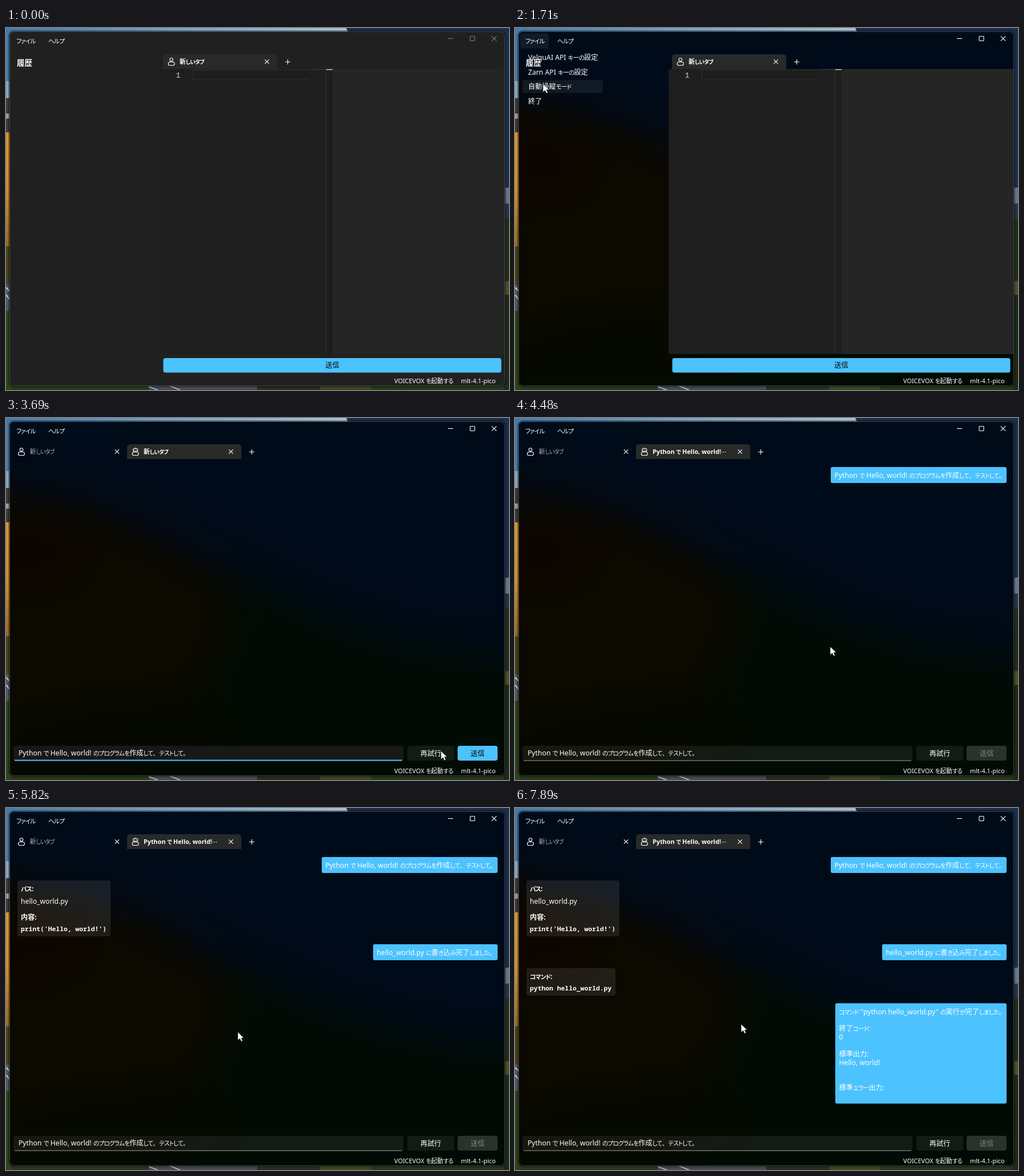
Animation of 881x635 px, one loop 8 s. Source, as an HTML page:

```html
<!DOCTYPE html>
<html lang="ja">
<head>
<meta charset="utf-8">
<style>
  html, body { margin: 0; width: 100%; height: 100%; overflow: hidden; background: #202020; }
  svg { display: block; }
  text { font: 12.2px 'Noto Sans', 'Noto Sans CJK JP', sans-serif; fill: #fff; white-space: pre; }
  .kana, .stop { font-family: 'Noto Sans CJK JP', sans-serif; font-size: .88em; }
  .kana { font-feature-settings: 'palt'; letter-spacing: -.08em; }
  .bold { font-weight: 700; }
  .title { font-size: 16px; font-weight: 700; }
  .title .kana { font-size: 1em; letter-spacing: -.04em; }
  .mono { font-family: 'Noto Sans Mono', monospace; font-size: 11.36px; font-weight: 600; }
  .small { font-size: 10.9px; }
  .small .kana { font-size: .94em; }
  .head { font-size: 13.5px; font-weight: 700; }
  .tab { font-size: 10.8px; font-weight: 700; }
  .dim { fill: #b0b0b0; font-size: 11.2px; }
  .line { fill: none; stroke: #fff; stroke-width: 1.1; }
</style>
</head>
<body>
<svg id="stage" width="881" height="635" viewBox="0 0 881 635"></svg>
<script>
const BLUE = '#4cc2ff', HOVER = '#49b0e6';
const SOFT = 'rgba(255,255,255,.065)';
const PROMPT = 'Python で Hello, world! のプログラムを作成して、テストして。';
const NEW_TAB = '新しいタブ';

// Kana are set proportionally and a little smaller than kanji; punctuation keeps its full width.
const kana = s => s.replace(/[ぁ-ヿ]+/g, '<tspan class="kana">$&</tspan>')
  .replace(/[、。…]/g, '<tspan class="stop">$&</tspan>');
const text = (x, mid, s, cls = '', attrs = '') =>
  `<text x="${x}" y="${mid + (cls === 'title' ? 6 : 4.4)}" class="${cls}" ${attrs}>${kana(s)}</text>`;
const label = (x, mid, s, fill = '#fff', id = '') =>
  text(x, mid, s, '', `id="${id}" text-anchor="middle" style="fill:${fill}"`);
const rect = (x, y, w, h, fill, r = 0, attrs = '') =>
  `<rect x="${x}" y="${y}" width="${w}" height="${h}" rx="${r}" fill="${fill}" ${attrs}/>`;
const group = (id, ...parts) => `<g id="${id}">${parts.join('')}</g>`;
const line = d => `<path class="line" d="${d}"/>`;
const cross = (x, y, r = 3.7) => line(`M${x - r} ${y - r}l${2 * r} ${2 * r}m0 ${-2 * r}l${-2 * r} ${2 * r}`);
const plus = (x, y) => line(`M${x - 4.5} ${y}h9m-4.5-4.5v9`);
const body = (x, y) => rect(x - 5.5, y + .8, 11, 5.7, 'none', 2.8, 'class="line"');
const person = (x, y) => `<circle class="line" cx="${x}" cy="${y - 3.4}" r="2.8"/>` + body(x, y);
const robot = (x, y) => rect(x - 4, y - 5.5, 8, 5, 'none', 2, 'class="line"') + body(x, y) +
  line(`M${x} ${y - 7}v1.5M${x - 2.2} ${y - 3}h1.4m1.6 0h1.4`);
const tab = x => `<path d="M${x} 72V52q0-6 6-6h188q6 0 6 6v20z" fill="#282a29"/>`;
const bands = (x, w, list) => list.map(([y, h, fill]) => rect(x, y, w, h, fill)).join('');
const gradient = (id, x2, y2, ...colors) => `<linearGradient id="${id}" x2="${x2}" y2="${y2}">` +
  colors.map((c, i) => `<stop offset="${i / (colors.length - 1)}" stop-color="${c}"/>`).join('') + '</linearGradient>';

const wallpaper = () =>
  rect(0, 0, 881, 635, '#26381a') + rect(0, 0, 600, 9, 'url(#sky)') +
  '<path d="M596 0H881V9H600z" fill="#1b2d4a"/>' +
  bands(0, 9, [[0, 93, '#447aa8'], [93, 30, '#86a5be'], [123, 60, '#3b3a37'], [150, 9, '#9b9a94'],
    [183, 200, 'url(#field)'], [383, 67, '#4a4218'], [450, 46, '#4d5864'], [496, 139, '#2b4418']]) +
  '<path d="M0 455l8 8M0 468l8 10" stroke="#c9ced4" stroke-width="2"/>' +
  bands(872, 9, [[0, 280, '#1a2f4c'], [280, 28, '#62758a'], [308, 26, '#22364a'], [334, 110, '#202e19'],
    [444, 24, '#4a5229'], [468, 167, '#1d2a17']]) +
  rect(250, 626, 190, 9, '#434a50') + '<path d="M250 629l16 6M285 627l20 8" stroke="#bfc4c8" stroke-width="1.5"/>' +
  rect(440, 626, 110, 9, '#262d21') + rect(550, 626, 90, 9, '#3a4721') +
  rect(5, 5, 870, 624, 'none', 9, 'stroke="#000" stroke-opacity=".35" stroke-width="2"');

const mica = () => `<g clip-path="url(#window)">${rect(6, 6, 868, 622, '#000b19')}<g filter="url(#blur)">
  <path d="M-80 150L270 225 420 280 560 350 720 400 960 430V720H-80z" fill="#010b03"/>
  <path d="M-80 110L130 150 270 205 370 270 400 360 340 470 200 540-80 570z" fill="#0c0900"/>
  <path d="M-80 160L90 180 150 230 110 290-80 310z" fill="#0d0600"/>
  <path d="M-80 560L100 500 320 470 440 560 200 660-80 700z" fill="#060900"/></g></g>`;

const dialog = (id, y, h, split, title, content) => group(id,
  rect(308, y, 265, h, '#202020', 7),
  `<path d="M308 ${split}V${y + 7}q0-7 7-7h251q7 0 7 7V${split}z" fill="#2b2b2b"/>`,
  rect(307.5, y, 266, h, 'none', 7, 'stroke="#414141"'),
  text(328, y + 32, title, 'title'), content,
  rect(328, split + 21, 109, 25.5, BLUE, 4, `id="${id}Ok"`), label(382.5, split + 34, '許可', '#000'),
  rect(444, split + 21, 109, 25.5, '#2d2d2d', 4), label(498.5, split + 34, '拒否'));
const writeInfo = (x, y) => text(x, y, 'パス:', 'bold') + text(x, y + 21.5, 'hello_world.py') +
  text(x, y + 49.5, '内容:', 'bold') + text(x, y + 70, "print('Hello, world!')", 'mono');
const runInfo = (x, y) => text(x, y, 'コマンド:', 'bold') + text(x, y + 20.2, 'python hello_world.py', 'mono');
const bubble = (id, x, y, h, lines) => group(id, rect(x, y, 861 - x, h, BLUE, 3),
  ...lines.map(([dy, s]) => text(x + 6.5, y + dy, s)));

const editorPage = group('editor',
  text(19, 61.5, '履歴', 'head'),
  tab(275), person(289.7, 59), text(304, 59, NEW_TAB, 'tab'), cross(457, 59), plus(493.5, 59.5),
  rect(269, 72, 303, 500, '#1e1e1e'), rect(572, 72, 302, 500, '#252525'),
  '<path d="M530 73.5H327.5V90H530" fill="none" stroke="#2b2b2b" stroke-width="1.5"/>',
  rect(533, 72, 27, 1.5, '#20394a'), rect(560, 72, 1, 500, '#353535'), rect(561, 72, 11, 2, '#a0a0a0'),
  '<text x="297.5" y="86.5" style="font:13.5px \'Liberation Mono\',monospace;fill:#e3c990">1</text>',
  rect(275.5, 579, 592, 25.5, BLUE, 4), label(571.5, 592, '送信', '#000'));

const chatPage = group('chat',
  person(27, 59), text(41.5, 59, NEW_TAB, 'dim'), cross(194.5, 59),
  tab(212), robot(226.7, 59), text(241, 59, '', 'tab', 'id="tabTitle"'), cross(394, 59), plus(430.5, 59.5),
  rect(13, 575, 683, 26.5, SOFT, 4, 'id="input"'), rect(15, 600.5, 679, 1, '#9a9d9a', 0, 'id="underline"'),
  text(22, 587.5, PROMPT, '', 'id="typed"'), rect(22, 580, 1, 16, '#fff', 0, 'id="caret"'),
  rect(703, 575, 82, 26, SOFT, 4), label(744, 588.5, '再試行'),
  rect(791, 575, 70, 26, BLUE, 4, 'id="send"'), label(826, 588.5, '送信', '#000', 'sendText'),
  bubble('ask', 553, 86, 28, [[14.5, PROMPT]]),
  group('writeCard', rect(20, 127, 163, 98, 'rgba(255,255,255,.085)', 4), writeInfo(26, 142)),
  bubble('written', 643, 239, 28, [[14.5, 'hello_world.py に書き込み完了しました。']]),
  group('runCard', rect(20, 281, 156, 48, 'rgba(255,255,255,.085)', 4), runInfo(26, 295.5)),
  bubble('result', 561, 342.5, 176, [[15, 'コマンド "python hello_world.py" の実行が完了しました。'],
    [44.5, '終了コード:'], [59.5, '0'], [89, '標準出力:'], [104, 'Hello, world!'], [148, '標準エラー出力:']]));

const MENU = ['VelquAI API キーの設定', 'Zarn API キーの設定', '自動操縦モード', '終了'];
stage.innerHTML = `<defs>
    <clipPath id="window">${rect(6, 6, 868, 622, '#000', 8)}</clipPath>
    <filter id="blur" x="-20%" y="-20%" width="140%" height="140%" color-interpolation-filters="sRGB">
      <feGaussianBlur stdDeviation="34"/></filter>
    ${gradient('sky', 1, 0, '#447aa8', '#7ba3c4', '#a9c1d2')}${gradient('field', 0, 1, '#d8962f', '#d08f2c', '#94691f')}
  </defs>` + wallpaper() + mica() +
  rect(6, 6, 868, 622, '#202020', 8, 'id="solid"') +
  rect(9, 9.5, 50, 26.5, SOFT, 4, 'id="fileHover"') +
  text(18, 23, 'ファイル') + text(74, 23, 'ヘルプ') +
  text(680, 619, 'VOICEVOX を起動する', 'small') + text(797, 619, 'mlt-4.1-pico', 'small') +
  editorPage + chatPage +
  group('menu', rect(13, 91.5, 141, 22.5, SOFT, 3, 'id="menuHover"'),
    ...MENU.map((s, i) => text(23, 51.5 + 25.7 * i, s))) +
  rect(6, 6, 868, 622, 'rgba(0,0,0,.3)', 8, 'id="shade"') +
  group('buttons', line('M774 18.5h9'), rect(813, 14.5, 8, 8, 'none', 1, 'class="line"'), cross(855, 18.5, 4.2)) +
  dialog('write', 205.5, 223.5, 362, '書き込みを許可しますか?', writeInfo(328, 265)) +
  dialog('run', 230, 174, 337, 'コマンドの実行を許可しますか?', runInfo(328, 290)) +
  rect(6.5, 6.5, 867, 621, 'none', 8, 'stroke="#4a4d50" stroke-opacity=".8"') +
  '<path id="cursor" d="M0 0V14.6L3.5 11.4 6 16.6 8.6 15.4 6.2 10.4H10.8z" fill="#fff" stroke="#111" stroke-width=".7"/>';

const el = id => document.getElementById(id);
const set = (id, attrs) => { for (const k in attrs) el(id).setAttribute(k, attrs[k]); };
const clamp = v => Math.min(1, Math.max(0, v));
const ramp = (t, from, to) => clamp((t - from) / (to - from));
const smooth = p => p * p * (3 - 2 * p);
const fade = (id, v) => { el(id).style.opacity = v; };
const during = (t, from, to = 8000) => t >= from && t < to ? 1 : 0;

// Pointer stops: time, x, y.
const PATH = [[130, 300, 660], [760, 36, 21], [1050, 36, 21], [1700, 49, 98], [2230, 49, 98], [2530, 409, 557],
  [2850, 455, 582], [3250, 455, 582], [3490, 758, 584], [3660, 758, 584], [3850, 812, 586], [4330, 812, 586],
  [4480, 552, 401], [5040, 406, 393], [6150, 406, 393], [6420, 398, 387], [6750, 398, 387], [6950, 396, 379], [8000, 396, 379]];
function pointer(t) {
  const i = PATH.findIndex(p => p[0] > t);
  if (i < 1) return PATH[0].slice(1);
  const [t0, x0, y0] = PATH[i - 1], [t1, x1, y1] = PATH[i], p = smooth(ramp(t, t0, t1));
  return [x0 + (x1 - x0) * p, y0 + (y1 - y0) * p];
}

function showDialog(id, t, open, close, [mx, my], cy, top) {
  const enter = 1 - (1 - ramp(t, open, open + 260)) ** 3, leave = ramp(t, close, close + 170);
  const scale = 1 + .05 * (1 - enter + leave);
  const alpha = ramp(t, open, open + 130) * (1 - leave);
  fade(id, alpha);
  set(id, { transform: `translate(440.5 ${cy}) scale(${scale}) translate(-440.5 ${-cy})` });
  const over = mx > 328 && mx < 437 && my > top && my < top + 25.5;
  set(id + 'Ok', { fill: over ? during(t, close - 70) ? '#4299c8' : HOVER : BLUE });
  return alpha;
}

function draw(t) {
  const [mx, my] = pointer(t), at = [mx, my];
  set('cursor', { transform: `translate(${mx} ${my})` });

  fade('solid', 1 - ramp(t, 890, 1150));
  fade('buttons', during(t, 870) ? 1 : .42);
  fade('fileHover', during(t, 760, 1800));
  fade('menu', ramp(t, 950, 1080) * (1 - ramp(t, 1780, 1850)));
  const item = Math.floor((my - 38.5) / 25.7);
  set('menuHover', { y: 40 + 25.7 * Math.max(0, item), opacity: item >= 0 && item < 4 ? 1 : 0 });

  fade('editor', during(t, 0, 1850));
  fade('chat', ramp(t, 1820, 2080));

  const focus = during(t, 2850, 3900), typed = during(t, 3220), sent = during(t, 4100);
  set('input', { fill: focus ? 'rgba(30,30,30,.75)' : SOFT });
  set('underline', { fill: focus ? BLUE : '#9a9d9a', height: focus ? 2 : 1, y: focus ? 599.5 : 600.5 });
  fade('typed', typed);
  set('caret', { x: typed ? 317 : 22, opacity: focus && (t - 2850) % 1060 < 530 ? 1 : 0 });
  const overSend = mx > 791 && my > 575;
  set('send', { fill: sent ? 'rgba(255,255,255,.16)' : overSend ? during(t, 3900) ? '#4299c8' : HOVER : BLUE });
  el('sendText').style.fill = sent ? '#858985' : '#000';
  const title = kana(sent ? 'Python で Hello, world!…' : NEW_TAB);
  if (draw.title !== title) el('tabTitle').innerHTML = draw.title = title;

  fade('ask', sent);
  fade('writeCard', during(t, 4690));
  fade('written', during(t, 5690));
  fade('runCard', during(t, 6150));
  fade('result', during(t, 7890));

  fade('shade', Math.max(
    showDialog('write', t, 4700, 5480, at, 317, 383),
    showDialog('run', t, 6150, 7080, at, 317, 358)));
}

function tick() {
  draw(performance.now() % 8000);
  requestAnimationFrame(tick);
}
tick();
</script>
</body>
</html>
```
